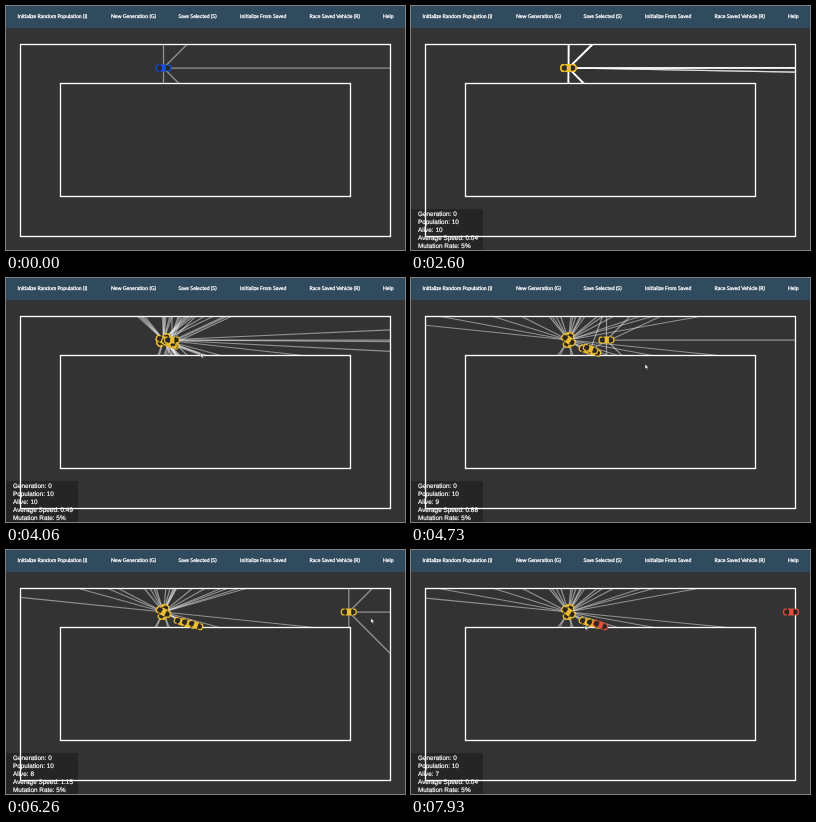
Write an HTML page that moves like this. It is 399 px wide and 244 px high and loops after 7.99 s.

```html
<!DOCTYPE html>
<html lang="en">
<head>
<meta charset="utf-8">
<title>Vehicle evolution</title>
<style>
  html, body { margin: 0; width: 100%; height: 100%; overflow: hidden; background: #333; }
  svg { display: block; width: 399px; height: 244px; }
  text { fill: #fff; stroke: #fff; text-rendering: geometricPrecision; }
  .menu { font: 5.15px Lato, sans-serif; stroke-width: .28; }
  .stats { font: 6.4px "Liberation Sans", Arial, sans-serif; }
  .stats text { stroke-width: .2; }
</style>
</head>
<body>
<svg viewBox="0 0 399 244">
  <defs>
    <g id="car">
      <rect x="-7.6" y="-3" width="15.2" height="6" rx="2.2" fill="#2b2822"/>
      <path d="M-4.2-2.9H-5.6Q-7.4-2.9-7.4 0T-5.6 2.9H-4.2M4.2-2.9H5.4Q7.4-2.9 7.4 0T5.4 2.9H4.2M-3-2.9H3M-3 2.9H3"
            fill="none" stroke="currentColor" stroke-width="1.3"/>
      <rect x="-1.8" y="-2.9" width="4.2" height="5.8" rx=".7" fill="currentColor"/>
    </g>
  </defs>
  <rect width="399" height="244" fill="#333"/>
  <rect width="399" height="22" fill="#304a5e"/>
  <g id="menu" class="menu"></g>
  <g id="stats" class="stats">
    <rect y="203" width="72" height="41" fill-opacity=".27"/>
  </g>
  <g id="rayLayer" stroke="#fff" stroke-opacity=".46" stroke-width="1.25" fill="none"></g>
  <g fill="none" stroke="#fff" stroke-width="1.3">
    <rect x="14.5" y="38.5" width="370" height="192"/>
    <rect x="54.5" y="77.5" width="290" height="113"/>
  </g>
  <g id="carLayer"></g>
  <path id="cursor" d="M0 0V5L1.2 4 2 5.8 2.9 5.4 2.1 3.7H3.6Z" fill="#fff" stroke="#111" stroke-width=".4"/>
</svg>
<script>
const LOOP = 7.99, SPAWN = 2.53, CRASH = 6.53, LAUNCH = 3.465;
const HOME = { x: 157.5, y: 62 };
const BLUE = '#104fe2', YELLOW = '#ecbd30', RED = '#e2503c';
const $ = id => document.getElementById(id);
const clamp = v => Math.min(1, Math.max(0, v));
const mix = (a, b, k) => a + (b - a) * k;

function add(parent, tag, attrs = {}, text = '') {
  const el = document.createElementNS('http://www.w3.org/2000/svg', tag);
  for (const key in attrs) el.setAttribute(key, attrs[key]);
  el.textContent = text;
  return parent.appendChild(el);
}

// Pointer stops: [time, x, y]
const STOPS = [
  [0.1, 357, 246], [0.89, 207, 119], [1.51, 98, 18], [2.05, 62, 8.5], [2.6, 62, 8.5],
  [3.3, 150, 62], [4.73, 234, 86], [5.4, 266, 87], [6.26, 365, 68], [7.93, 174, 75]
];

function pointer(t) {
  const i = Math.max(1, STOPS.findIndex(stop => stop[0] >= t));
  const [t0, x0, y0] = STOPS[i - 1], [t1, x1, y1] = STOPS[i];
  const k = clamp((t - t0) / (t1 - t0));
  return [mix(x0, x1, k), mix(y0, y1, k)];
}

function boxWalls(x1, y1, x2, y2) {
  return [{ x: x1, y1, y2 }, { x: x2, y1, y2 }, { y: y1, x1, x2 }, { y: y2, x1, x2 }];
}
const WALLS = [...boxWalls(14.5, 38.5, 384.5, 230.5), ...boxWalls(54.5, 77.5, 344.5, 190.5)];

function rayLength(x, y, dx, dy) {
  let best = 400;
  for (const w of WALLS) {
    const vertical = w.x !== undefined;
    const d = vertical ? (w.x - x) / dx : (w.y - y) / dy;
    if (!(d > 0 && d < best)) continue;
    const along = vertical ? y + dy * d : x + dx * d;
    const [from, to] = vertical ? [w.y1, w.y2] : [w.x1, w.x2];
    if (along >= from && along <= to) best = d;
  }
  return best;
}

function sensorPath({ x, y, angle }) {
  return [-90, -45, 0, 45, 90].map(offset => {
    const a = (angle + offset) * Math.PI / 180, dx = Math.cos(a), dy = Math.sin(a);
    const d = rayLength(x, y, dx, dy);
    return `M${x} ${y}L${(x + dx * d).toFixed(2)} ${(y + dy * d).toFixed(2)}`;
  }).join('');
}

// Turns on the spot: four vehicles to the left, two to the right
function spinner(i, t) {
  const heading = i < 4 ? 7 * i - 84 : 7 + 5 * i;
  const wobble = 3 * Math.sin(2 * t + i);
  return { ...HOME, angle: (heading + wobble) * clamp((t - SPAWN) / 2) ** 2, color: YELLOW, sensing: true };
}

// Drifts into the inner wall
const strayEnd = i => 4.4 + 0.3 * i;
function stray(i, t) {
  const k = clamp((t - 3.4) / (strayEnd(i) - 3.4)) ** 2;
  return {
    x: mix(HOME.x, 175.5 + 7 * i, k),
    y: mix(HOME.y, 72 + 1.5 * i, k),
    angle: 20 * clamp((t - SPAWN) / 1.4),
    color: i === 2 && t >= CRASH ? RED : YELLOW,
    sensing: k < 1
  };
}

// Accelerates evenly into the right wall
function leader(t) {
  const s = Math.max(0, t - LAUNCH), running = t < CRASH;
  return {
    x: Math.min(380, HOME.x + 23.7 * s * s), y: HOME.y,
    angle: 0, color: running ? YELLOW : RED, sensing: running
  };
}

function vehicles(t) {
  if (t < SPAWN) return [{ ...HOME, angle: 0, color: BLUE, sensing: true }];
  return [
    ...Array.from({ length: 6 }, (_, i) => spinner(i, t)),
    ...[0, 1, 2].map(i => stray(i, t)),
    leader(t)
  ];
}

function averageSpeed(t) {
  const leading = t < CRASH ? 0.398 * Math.max(0, t - LAUNCH) : 0;
  const drifting = t < strayEnd(2) ? 0.12 * Math.max(0, t - SPAWN) ** 1.3 : 0;
  return 0.04 + leading + drifting;
}

[['Initialize Random Population (I)', 11.5], ['New Generation (G)', 105], ['Save Selected (S)', 172.5],
 ['Initialize From Saved', 234], ['Race Saved Vehicle (R)', 303.5], ['Help', 377]]
  .forEach(([label, x]) => add($('menu'), 'text', { x, y: 11.8 }, label));

const lines = ['Generation: 0', 'Population: 10', '', '', 'Mutation Rate: 5%']
  .map((line, i) => add($('stats'), 'text', { x: 7, y: 210 + i * 8 }, line));
const slots = Array.from({ length: 10 }, () => ({
  rays: add($('rayLayer'), 'path'),
  car: add($('carLayer'), 'use', { href: '#car' })
}));

function render(t) {
  const list = vehicles(t);
  slots.forEach(({ rays, car }, i) => {
    const v = list[i];
    car.style.display = v ? '' : 'none';
    rays.setAttribute('d', v && v.sensing ? sensorPath(v) : '');
    if (!v) return;
    car.setAttribute('transform', `translate(${v.x} ${v.y}) rotate(${v.angle})`);
    car.style.color = v.color;
  });
  $('stats').style.display = t < SPAWN ? 'none' : '';
  const crashes = [strayEnd(1), strayEnd(2), CRASH].filter(end => t >= end);
  lines[2].textContent = `Alive: ${10 - crashes.length}`;
  lines[3].textContent = `Average Speed: ${averageSpeed(t).toFixed(2)}`;
  $('cursor').setAttribute('transform', `translate(${pointer(t).join(' ')})`);
}

const start = performance.now();
function tick(now) {
  // The last pointer stop holds until the loop restarts
  render(Math.min(Math.max(0, now - start) / 1000 % LOOP, STOPS.at(-1)[0]));
  requestAnimationFrame(tick);
}
render(0);
requestAnimationFrame(tick);
</script>
</body>
</html>
```
